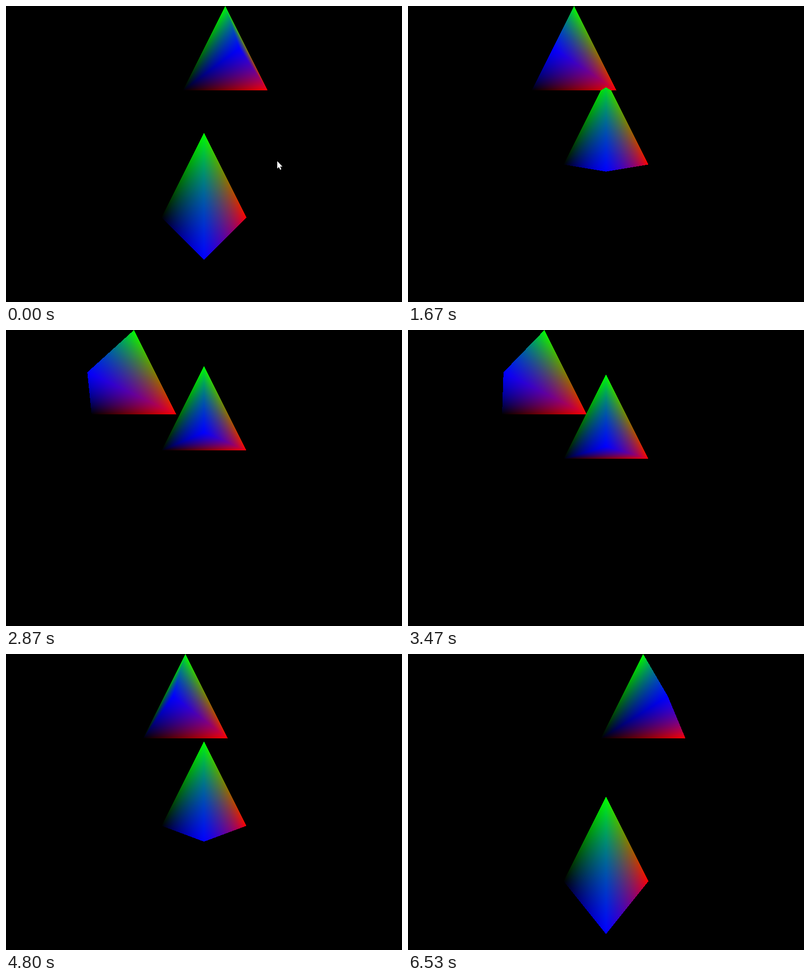
An HTML page with a canvas that plays this animation: 800 px wide and 600 px high, repeating every 6.59 s.

```html
<!DOCTYPE html>
<html lang="en">
<head>
<meta charset="utf-8">
<title>Two pyramids</title>
<style>
  html, body { margin: 0; width: 100%; height: 100%; overflow: hidden; background: #000; }
  canvas { display: block; }
</style>
</head>
<body>
<canvas id="stage" width="800" height="600"></canvas>
<script>
const W = 800, H = 600, LOOP = 6590, TICK = 200 / 3;
const UNIT = 600 / 7;   // pixels per world unit at the base plane
const NEAR = 5 / 3;     // magnification of the vertex nearest the viewer
const STEP = 0.0125, TURN = 46, LOW = -1.75;

const ctx = document.getElementById("stage").getContext("2d");
const image = ctx.createImageData(W, H);
const pixels = new Uint32Array(image.data.buffer);
const depth = new Float32Array(W * H);

const BLACK = { x: -1, y: 0, k: 1, rgb: [0, 0, 0] };
const RED = { x: 1, y: 0, k: 1, rgb: [255, 0, 0] };
const GREEN = { x: 0, y: -2, k: 1, rgb: [0, 255, 0] };
const BLUE = { x: 0, y: 0, k: NEAR, rgb: [0, 0, 255] };
const FACES = [[GREEN, BLACK, BLUE], [GREEN, RED, BLUE], [BLACK, RED, BLUE]];

const project = (v, px, py) => ({
  x: W / 2 + (v.x + px) * UNIT * v.k,
  y: H / 2 + (v.y + py) * UNIT * v.k,
  k: v.k,
  rgb: v.rgb
});

const cross = (a, b, x, y) => (b.x - a.x) * (y - a.y) - (b.y - a.y) * (x - a.x);

// Depth-tested triangle with perspective-correct colours
function fillFace(a, b, c) {
  const area = cross(a, b, c.x, c.y);
  if (Math.abs(area) < 1e-6) return;
  const xs = [a.x, b.x, c.x], ys = [a.y, b.y, c.y];
  const x0 = Math.max(0, Math.floor(Math.min(...xs)));
  const x1 = Math.min(W, Math.ceil(Math.max(...xs)));
  const y0 = Math.max(0, Math.floor(Math.min(...ys)));
  const y1 = Math.min(H, Math.ceil(Math.max(...ys)));
  for (let y = y0; y < y1; y++) {
    for (let x = x0; x < x1; x++) {
      let u = cross(b, c, x + 0.5, y + 0.5) / area;
      let v = cross(c, a, x + 0.5, y + 0.5) / area;
      let w = 1 - u - v;
      if (u < 0 || v < 0 || w < 0) continue;
      u *= a.k; v *= b.k; w *= c.k;
      const k = u + v + w, i = y * W + x;
      if (k <= depth[i]) continue;
      depth[i] = k;
      const mix = n => Math.round((u * a.rgb[n] + v * b.rgb[n] + w * c.rgb[n]) / k);
      pixels[i] = (255 << 24 | mix(2) << 16 | mix(1) << 8 | mix(0)) >>> 0;
    }
  }
}

function drawPyramid(px, py) {
  for (const face of FACES) fillFace(...face.map(v => project(v, px, py)));
}

function drawPointer(x, y) {
  ctx.save();
  ctx.translate(x, y);
  ctx.fillStyle = "#fff";
  ctx.fill(new Path2D("M0 0V15L3.3 12L6 17.5L8.2 16.5L5.8 11H10.5Z"));
  ctx.restore();
}

// Down at a steady pace, then back up slightly faster
const offsetAt = n => n < TURN
  ? Math.max(LOW, 0.5 - 4 * STEP * n)
  : LOW + Math.floor((n - TURN) * 4.043) * STEP;

function draw(n) {
  const offset = offsetAt(n);
  pixels.fill(0xff000000);
  depth.fill(0);
  drawPyramid(offset, -1.5);
  drawPyramid(0, 1 + offset);
  ctx.putImageData(image, 0, 0);
  if (n === 0) drawPointer(548, 314.5);
  if (n === 1) drawPointer(650.5, 314.5);
}

const start = performance.now();
let shown = -1;

function tick() {
  const t = (performance.now() - start) % LOOP;
  const n = Math.floor((Math.floor(t / 10) * 10 + 4) / TICK);
  if (n !== shown) draw(shown = n);
  requestAnimationFrame(tick);
}
tick();
</script>
</body>
</html>
```
